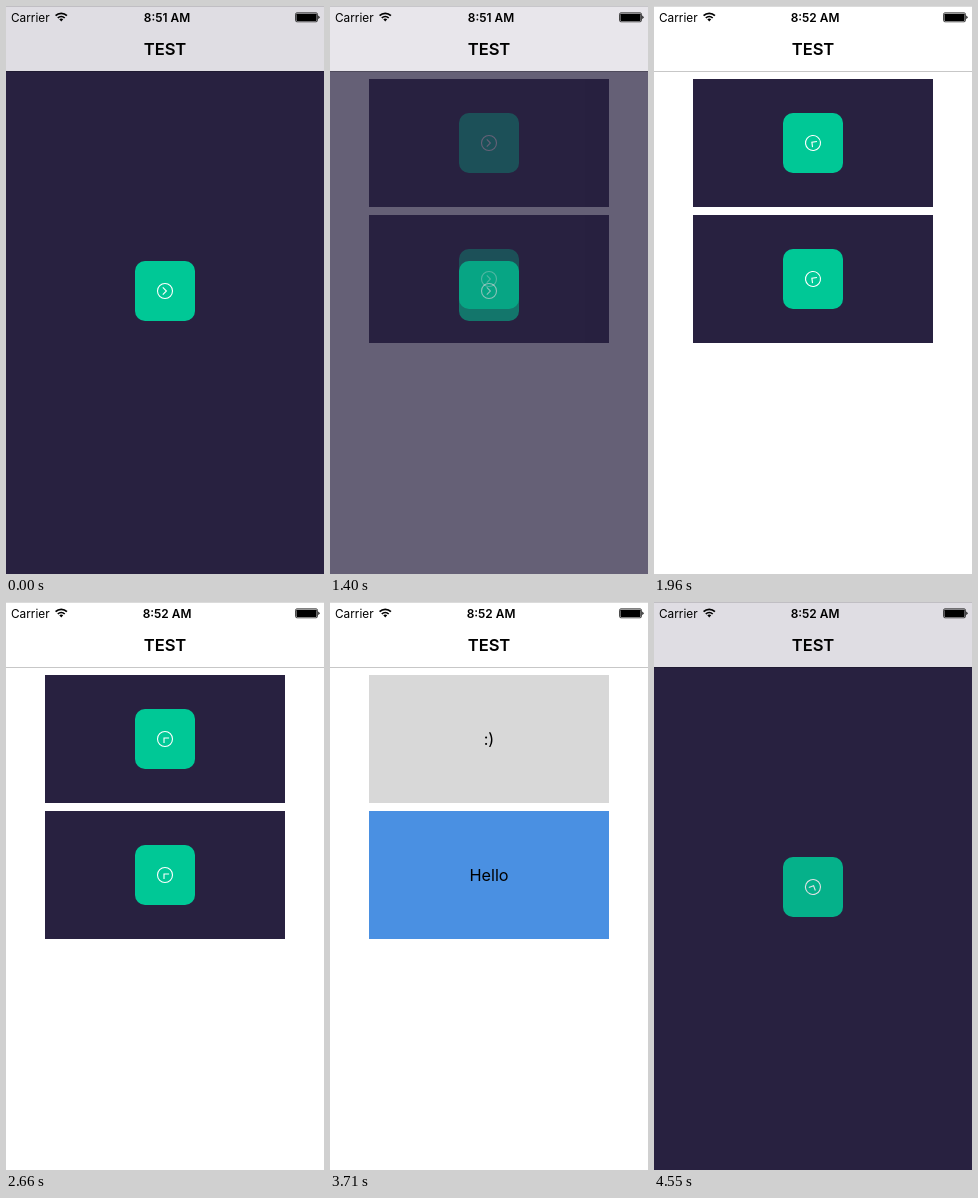
Write an HTML page that moves like this. It is 318 by 568 pixels and loops after 4.62 s.

```html
<!DOCTYPE html>
<html lang="en">
<head>
<meta charset="utf-8">
<title>Loading states</title>
<style>
  html, body { margin: 0; width: 100%; height: 100%; overflow: hidden; background: #fff; }
  svg { display: block; width: 318px; height: 568px; }
  text { font-family: Inter, "Liberation Sans", sans-serif; fill: #000; }
  .mid { text-anchor: middle; }
</style>
</head>
<body>
<svg viewBox="0 0 318 568">
  <defs>
    <g id="glyph" fill="none" stroke="#fff" stroke-width="1.1">
      <circle r="7.5"/>
      <path d="M-2.2 -3.6L1.4 0L-2.2 3.6"/>
    </g>
  </defs>
  <rect width="318" height="568" fill="#fff"/>

  <rect x="39" y="73" width="240" height="128" fill="#d8d8d8"/>
  <text class="mid" x="159" y="143" font-size="16.3">:)</text>
  <rect x="39" y="209" width="240" height="128" fill="#4a90e2"/>
  <text class="mid" x="159" y="279" font-size="16.3">Hello</text>

  <g id="loaders"></g>

  <rect width="318" height="65" fill="#fff"/>
  <rect id="tint" width="318" height="65" fill="#dfdde3"/>
  <rect y="65" width="318" height="1" fill="#000" opacity=".22"/>
  <rect width="318" height="1" fill="#000" opacity=".14"/>

  <text x="5" y="15.6" font-size="11.8">Carrier</text>
  <g fill="none" stroke="#000" stroke-width="1.7">
    <path d="M49.6 9.7A8 8 0 0 1 60.9 9.7"/>
    <path d="M51.8 12A4.9 4.9 0 0 1 58.7 12"/>
  </g>
  <path d="M53.3 13.3A2.9 2.9 0 0 1 57.2 13.3L55.25 15.4Z"/>
  <text id="clock" class="mid" x="161" y="15.6" font-size="11.9" font-weight="600"></text>
  <rect x="289.5" y="6.8" width="22" height="9" rx="1.5" fill="none" stroke="#000" stroke-width=".7"/>
  <rect x="290.4" y="7.7" width="20.2" height="7.2" rx=".6"/>
  <path d="M312.3 9.6a1.8 1.8 0 0 1 0 3.4Z"/>
  <text class="mid" x="159" y="49" font-size="16.6" font-weight="600">TEST</text>
</svg>
<script>
const LOOP = 4620, STEP = 70, FADE = 250;
const byId = id => document.getElementById(id);

function makeLoader(x, y, w, h) {
  const cx = x + w / 2, cy = y + h / 2;
  const group = document.createElementNS('http://www.w3.org/2000/svg', 'g');
  group.innerHTML = `<rect x="${x}" y="${y}" width="${w}" height="${h}" fill="#282140"/>
    <g><rect x="${cx - 30}" y="${cy - 30}" width="60" height="60" rx="10" fill="#00c896"/>
    <g transform="translate(${cx} ${cy})"><use href="#glyph"/></g></g>`;
  byId('loaders').append(group);
  return { group, box: group.querySelector('g'), glyph: group.querySelector('use') };
}

const top_ = makeLoader(39, 73, 240, 128);
const bottom = makeLoader(39, 209, 240, 128);
const screen_ = makeLoader(0, 2, 318, 566);

// Time in ms and rotation in degrees.
const spin = [[0, 0], [1400, 1440], [1960, 2018], [2660, 2745], [3080, 3150], [4550, 4615], [4620, 4680]];

function angleAt(t) {
  const i = Math.max(1, spin.findIndex(([time]) => time >= t));
  const [t0, a0] = spin[i - 1], [t1, a1] = spin[i];
  return a0 + (a1 - a0) * (t - t0) / (t1 - t0);
}

function ease(t, from, to) {
  const p = Math.min(1, Math.max(0, (t - from) / (to - from)));
  return p * p * (3 - 2 * p);
}

const fadeOut = (t, start) => 1 - ease(t, start, start + FADE);

function setLoader(loader, outer, inner, angle) {
  loader.group.setAttribute('opacity', outer);
  loader.box.setAttribute('opacity', inner);
  loader.glyph.setAttribute('transform', `rotate(${angle})`);
}

function draw(t) {
  const angle = angleAt(t) % 360;
  const first = fadeOut(t, 3340), second = fadeOut(t, 2810), full = fadeOut(t, 1312);
  const outer = full + ease(t, 4340, 4550) * (t >= 4410);
  const inner = full + ease(t, 4380, 4600) * (t >= 4410);
  setLoader(top_, first, first, angle);
  setLoader(bottom, second, second, angle);
  setLoader(screen_, outer, inner, angle);
  byId('tint').setAttribute('opacity', outer);
  byId('clock').textContent = t < 1890 ? '8:51 AM' : '8:52 AM';
}

const start = performance.now();
function tick() {
  const t = (performance.now() - start) % LOOP;
  draw(Math.floor(t / STEP) * STEP);
  requestAnimationFrame(tick);
}
tick();
</script>
</body>
</html>
```
